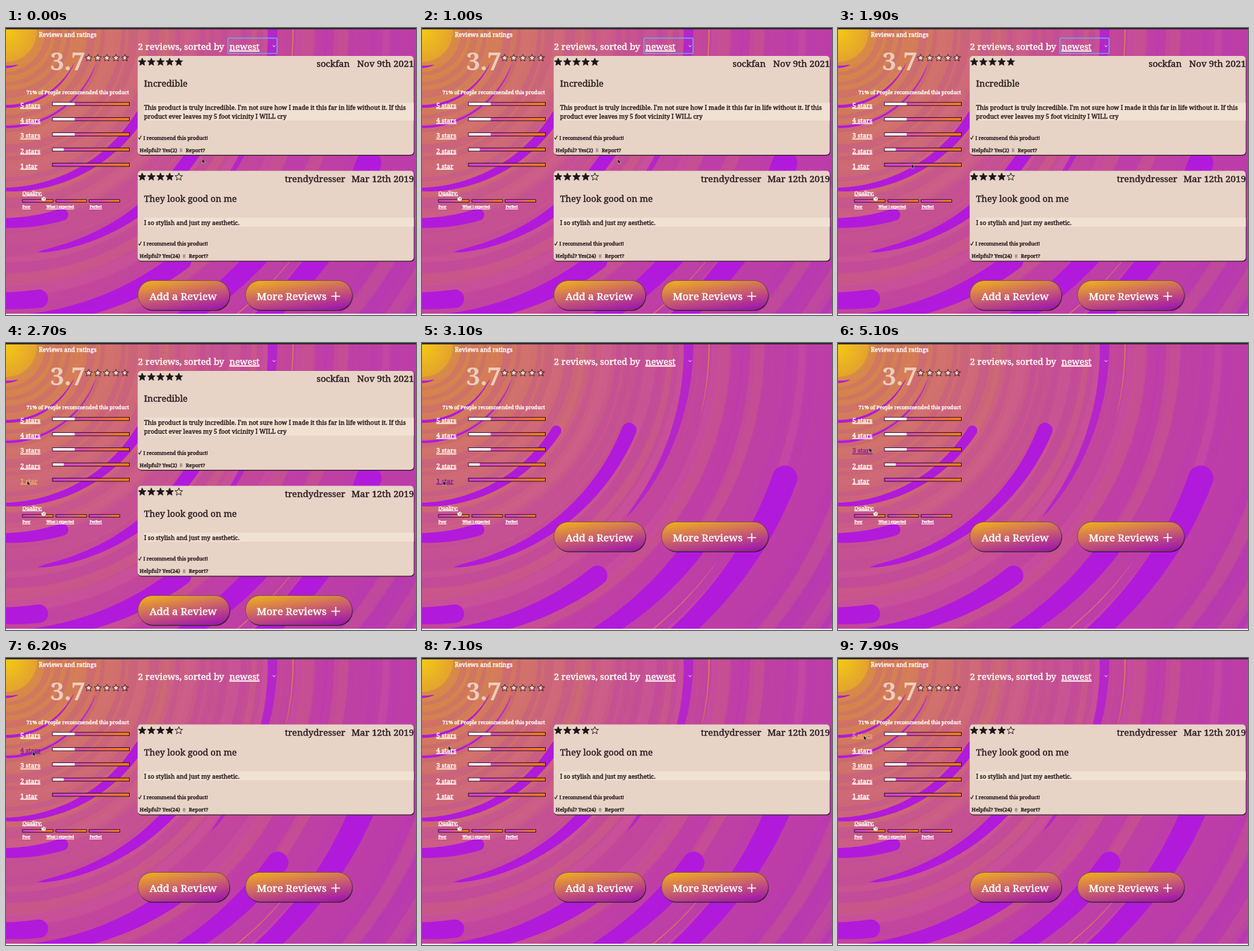
An HTML page that plays this animation: 600x421 px, repeating every 8000 ms.

```html
<!DOCTYPE html>
<html lang="en">
<head>
<meta charset="utf-8">
<title>Reviews and ratings</title>
<style>
  html, body { margin: 0; width: 100%; height: 100%; overflow: hidden; background: #fff; }
  svg { display: block; width: 600px; height: 421px; }
  text { font-family: "Noto Serif", "Liberation Serif", serif; white-space: pre; stroke-width: .42px; }
  .light { fill: #fff; stroke: #fff; }
  .dark { fill: #2c1c20; stroke: #2c1c20; }
  .link { text-decoration: underline; }
</style>
</head>
<body>
<svg id="stage" viewBox="0 0 600 421" xmlns="http://www.w3.org/2000/svg">
  <defs>
    <radialGradient id="sky" gradientUnits="userSpaceOnUse" cx="0" cy="5" r="720">
      <stop offset="0" stop-color="#dc9a38"/>
      <stop offset=".1" stop-color="#d5834e"/>
      <stop offset=".2" stop-color="#d07464"/>
      <stop offset=".3" stop-color="#cc6678"/>
      <stop offset=".44" stop-color="#c65290"/>
      <stop offset=".62" stop-color="#c2439f"/>
      <stop offset="1" stop-color="#b83bad"/>
    </radialGradient>
    <radialGradient id="sun" gradientUnits="userSpaceOnUse" cx="0" cy="5" r="46">
      <stop offset="0" stop-color="#f4c814"/>
      <stop offset="1" stop-color="#e3a22e"/>
    </radialGradient>
    <linearGradient id="bar">
      <stop offset="0" stop-color="#d63be0"/>
      <stop offset=".3" stop-color="#dc4cc0"/>
      <stop offset="1" stop-color="#ff8408"/>
    </linearGradient>
    <linearGradient id="pill" gradientUnits="objectBoundingBox" x1=".2" y1="-.1" x2=".8" y2="1.1">
      <stop offset="0" stop-color="#f2b616"/>
      <stop offset=".5" stop-color="#c95f6c"/>
      <stop offset="1" stop-color="#9a0cb8"/>
    </linearGradient>
    <linearGradient id="part">
      <stop offset=".6" stop-color="#f0d8c6"/>
      <stop offset=".6" stop-color="#f0d8c6" stop-opacity="0"/>
    </linearGradient>
  </defs>
  <rect width="600" height="421" fill="url(#sky)"/>
  <g id="swirl"></g>
  <g id="side"></g>
  <g id="head"></g>
  <g id="first"></g>
  <g id="second"></g>
  <g id="buttons"></g>
  <path id="cursor" d="M0 0V7L1.7 5.6 2.8 8 4 7.4 2.9 5.2H5Z" fill="#111" stroke="#ddd" stroke-width=".5"/>
  <rect width="600" height="2" fill="#2d2a30"/>
  <rect y="419.3" width="600" height="2" fill="#fff"/>
</svg>
<script>
const NS = 'http://www.w3.org/2000/svg';
const $ = id => document.getElementById(id);

function add(parent, tag, attrs, content) {
  const el = document.createElementNS(NS, tag);
  for (const k in attrs) el.setAttribute(k, attrs[k]);
  if (content) el.textContent = content;
  return parent.appendChild(el);
}
const rect = (g, x, y, width, height, fill, more) =>
  add(g, 'rect', { x, y, width, height, fill, ...more });
const text = (g, x, y, size, cls, content, more) =>
  add(g, 'text', { x, y, 'font-size': size, class: cls, ...more }, content);

// Arc around the top left corner: round at angle a0, tapering to a point at a1
function swoosh(r, a0, a1, w, fill, opacity = 1) {
  const n = 32, outer = [], inner = [];
  const at = (rad, deg) => {
    const a = deg * Math.PI / 180;
    return (rad * Math.cos(a)).toFixed(1) + ' ' + (5 + rad * Math.sin(a)).toFixed(1);
  };
  for (let i = 0; i <= n; i++) {
    const a = a0 + (a1 - a0) * i / n, h = w / 2 * Math.sqrt(1 - i / n);
    outer.push(at(r + h, a));
    inner.unshift(at(r - h, a));
  }
  add($('swirl'), 'path', {
    d: `M${outer.join('L')}L${inner.join('L')}A${w / 2} ${w / 2} 0 0 ${a1 > a0 ? 1 : 0} ${outer[0]}Z`,
    fill, opacity
  });
}

function drawSwirl() {
  let seed = 11;
  const rnd = () => (seed = seed * 16807 % 2147483647) / 2147483647;
  const tints = ['#d98a50', '#b42cc4', '#d8689a', '#b83cb0'];
  for (let r = 62; r < 740; r += 13 + rnd() * 6) {
    const [a0, a1] = rnd() < .5 ? [-30, 110] : [120, -20];
    swoosh(r, a0, a1, 10 + r / 35, tints[Math.floor(rnd() * 4)], .16);
  }
  const purple = '#b11ada';
  [[232, 32, 98, 15], [327, 22, 82, 22], [565, 20, 84, 37], [495, 36.6, 84, 32],
   [423, 52.5, 96, 29], [395, 83, 125, 27], [281, 73, 120, 18],
   [110, 105, 25, 5], [140, 105, 20, 4], [52, 95, 70, 4]]
    .forEach(b => swoosh(...b, purple));
  swoosh(390, -12, 40, 16, purple, .75);
  [[420, -5, 14, 2], [535, 62, 36, 2]].forEach(b => swoosh(...b, '#e08a4c', .8));
  add($('swirl'), 'circle', { cx: 0, cy: 5, r: 45, fill: 'url(#sun)' });
}

function star(g, cx, cy, r, fill, stroke) {
  const pts = [...Array(10).keys()].map(i => {
    const a = i * Math.PI / 5 - Math.PI / 2, q = i % 2 ? r * .45 : r;
    return (cx + q * Math.cos(a)).toFixed(2) + ',' + (cy + q * Math.sin(a)).toFixed(2);
  });
  add(g, 'polygon', { points: pts.join(' '), fill, stroke, 'stroke-width': .9, 'stroke-linejoin': 'round' });
}

const links = [];
function drawSide() {
  const g = $('side');
  text(g, 48, 12.5, 8.8, 'light', 'Reviews and ratings');
  text(g, 65, 62, 36, '', '3.7', { fill: '#edcdbc', 'font-weight': 700 });
  for (let i = 0; i < 5; i++)
    star(g, 121 + i * 13.3, 44, 5.4, i < 4 ? '#f0d8c6' : 'url(#part)', '#2a1820');
  text(g, 30, 96.5, 7.55, 'light', '71% of People recommended this product');
  [32, 32, 32, 16, 0].forEach((w, i) => {
    const y = 111.3 + i * 22.3, n = 5 - i;
    links.push(text(g, 21, y + 5.3, 9.4, 'light link', n + (n > 1 ? ' stars' : ' star')));
    rect(g, 68, y - 2.2, 112.5, 4.6, 'url(#bar)', { stroke: '#2b1524', 'stroke-width': 1 });
    rect(g, 68.5, y - 1.7, w, 3.6, '#fff');
  });
  text(g, 24, 244.5, 7.6, 'light link', 'Quality:');
  [24, 73, 121.5].forEach(x =>
    rect(g, x, 251.7, 45, 3.8, 'url(#bar)', { stroke: '#2b1524', 'stroke-width': .9 }));
  add(g, 'circle', { cx: 55, cy: 250.5, r: 3.2, fill: '#f6ece4' });
  add(g, 'path', { d: 'M53 249l1.2-1.8M55 250.5h1.6M56 247.6l.8 1', stroke: '#40252c', 'stroke-width': .8 });
  [[24, 'Poor'], [59, 'What i expected'], [122.5, 'Perfect']].forEach(([x, s]) =>
    text(g, x, 264.3, 5.25, 'light link', s));
}

let ring;
function drawHead() {
  const g = $('head');
  ring = rect(g, 324.8, 14.8, 71.8, 22.6, 'none', { rx: 1.5, stroke: '#6fa6f4', 'stroke-width': 1.4 });
  text(g, 193, 32, 13.3, 'light', '2 reviews, sorted by');
  text(g, 327, 32, 13, 'light link', 'newest');
  add(g, 'path', { d: 'M390.3 25.5l2 2 2-2', fill: 'none', stroke: '#fff', 'stroke-width': 1 });
}

function drawCard(g, y, h, c) {
  rect(g, 193.3, y + 1.3, 404.2, h, '#35202c', { rx: 5 });
  rect(g, 192.7, y, 404, h, '#e7d4c7', { rx: 5 });
  rect(g, 202, y + 68.8, 394.7, c.lines.length * 13, '#f1e1d2');
  for (let i = 0; i < 5; i++)
    star(g, 199.3 + i * 13.4, y + 9, 5.8, i < c.stars ? '#1d1518' : 'none', '#1d1518');
  const end = { 'text-anchor': 'end' };
  text(g, c.nameEnd, y + 16, 13.2, 'dark', c.name, end);
  text(g, 597, y + 16, 13.4, 'dark', c.date, end);
  text(g, 202, y + 45, 13, 'dark', c.title);
  c.lines.forEach((s, i) => text(g, 202, y + 79 + i * 13.1, 8.97, 'dark', s));
  const foot = y + h;
  add(g, 'path', { d: `M193.8 ${foot - 25}l1.6 2 2.6-5`, fill: 'none', stroke: '#2c1c20', 'stroke-width': 1.1 });
  text(g, 201, foot - 22.3, 7.45, 'dark', 'I recommend this product!');
  text(g, 195.5, foot - 4.3, 7.75, 'dark', `Helpful? Yes(${c.votes})`);
  add(g, 'path', { d: `M${c.report - 7.8} ${foot - 9.5}v5.5m2 0v-5.5`, stroke: '#2c1c20', 'stroke-width': .6 });
  text(g, c.report, foot - 4.3, 7.7, 'dark', 'Report?');
}

function drawButton(x, w, tx, label) {
  const g = $('buttons');
  rect(g, x + .8, 371.2, w - .8, 43.6, '#2a1030', { rx: 21.8 });
  rect(g, x, 370.4, w - .9, 43, 'url(#pill)', { rx: 21.5, stroke: '#6e4a48', 'stroke-width': .8 });
  text(g, tx, 399.2, 15.2, 'light', label);
}

drawSwirl();
drawSide();
drawHead();
drawCard($('first'), 41, 145, {
  stars: 5, name: 'sockfan', nameEnd: 503, date: 'Nov 9th 2021', title: 'Incredible',
  lines: ["This product is truly incredible. I'm not sure how I made it this far in life without it. If this",
          'product ever leaves my 5 foot vicinity I WILL cry'],
  votes: 2, report: 263
});
drawCard($('second'), 209.5, 132, {
  stars: 4, name: 'trendydresser', nameEnd: 496.5, date: 'Mar 12th 2019', title: 'They look good on me',
  lines: ['I so stylish and just my aesthetic.'],
  votes: 24, report: 267.5
});
drawButton(193, 135, 210, 'Add a Review');
drawButton(350.5, 157, 367, 'More Reviews');
add($('buttons'), 'path', { d: 'M476 393.5h13m-6.5-6.5v13', stroke: '#fff', 'stroke-width': 1.6 });

// Pointer route: time, x, y
const route = [[0, 287, 191.5], [100, 287, 191.5], [300, 286.3, 192], [1200, 286.3, 192], [2300, 31, 202],
  [3600, 31, 202], [4000, 45, 195.5], [4250, 42, 178], [4700, 42, 178], [4950, 45.5, 153.5],
  [5350, 45.5, 153.5], [5700, 39, 137], [6900, 39, 137], [7400, 37.5, 113.5], [8000, 37.5, 113.5]];
// Per link, five stars first: pointer enters, clicks, leaves
const visits = [[7250, 8100, 8100], [5550, 5800, 7100], [4850, 5000, 5450], [4180, 4400, 4800], [2250, 2750, 4080]];

function pointer(t) {
  const i = route.findIndex(p => p[0] > t);
  const [t0, x0, y0] = route[i - 1], [t1, x1, y1] = route[i];
  const u = (t - t0) / (t1 - t0), k = u * u * (3 - 2 * u);
  return [x0 + (x1 - x0) * k, y0 + (y1 - y0) * k];
}

const show = (el, on) => el.setAttribute('visibility', on ? 'visible' : 'hidden');
const shift = (el, dy) => el.setAttribute('transform', `translate(0 ${dy})`);

function frame(now) {
  const t = now % 8000;
  const all = t < 2800, one = t >= 5900;
  $('cursor').setAttribute('transform', `translate(${pointer(t)})`);
  show(ring, t < 2600);
  show($('first'), all);
  show($('second'), all || one);
  shift($('second'), all ? 0 : -112);
  shift($('buttons'), all ? 0 : one ? -56 : -108);
  links.forEach((el, i) => {
    const [enter, click, leave] = visits[i];
    const color = t < enter || t >= leave ? '#fff' : t < click ? '#e8aa66' : '#86209a';
    el.style.fill = el.style.stroke = color;
  });
  requestAnimationFrame(frame);
}
requestAnimationFrame(frame);
</script>
</body>
</html>
```
